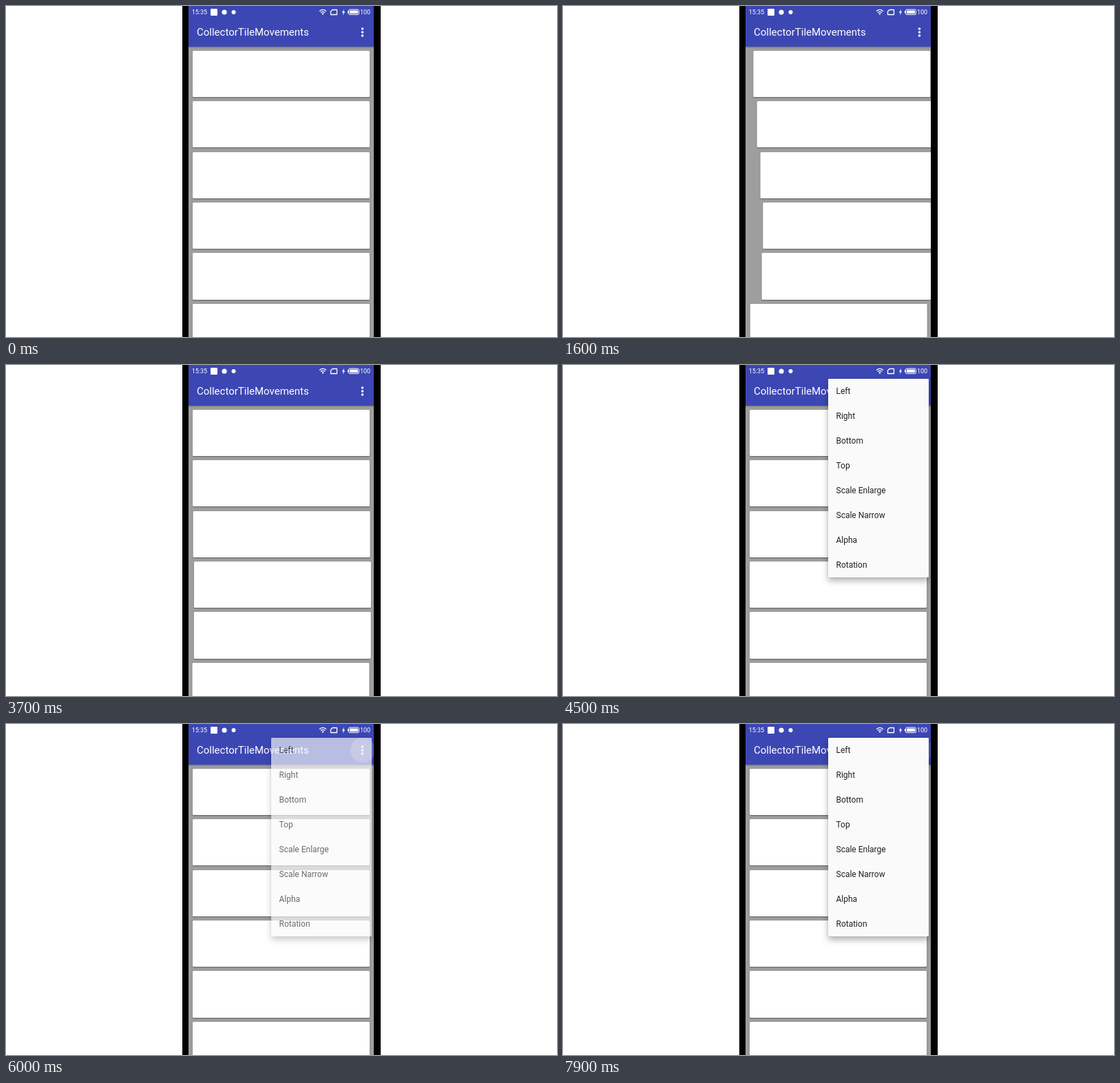
Animation of 800 by 480 pixels, one loop 8000 ms. Source, as an HTML page:

```html
<!DOCTYPE html>
<html lang="en">
<head>
<meta charset="utf-8">
<style>
  html, body { margin: 0; width: 100%; height: 100%; overflow: hidden; background: #fff; }
  body { position: relative; font-family: Roboto, sans-serif; }
  div { position: absolute; box-sizing: border-box; }
  #phone { left: 256px; top: 0; width: 288px; height: 480px; background: #000; }
  #screen { left: 9px; top: 0; width: 269px; height: 480px; overflow: hidden; background: #9e9e9e; }
  .card { left: 5.5px; width: 257.5px; height: 67.3px; border-radius: 1.5px; background: #fff;
          box-shadow: 0 1px 1.5px rgba(0, 0, 0, .4); }
  #bar { left: 0; top: 0; width: 100%; height: 59px; background: #3c47b3; color: #fff;
         box-shadow: 0 1px 2px rgba(0, 0, 0, .3); }
  #bar svg { position: absolute; left: 0; top: 0; }
  #title { left: 12px; top: 28px; font-size: 15px; line-height: 20px; white-space: nowrap; }
  #ripple { left: 234.5px; top: 20px; width: 36px; height: 36px; border-radius: 50%; background: #fff; }
  #menu { left: 119.5px; top: 20px; width: 146.5px; height: 287.5px; border-radius: 1px;
          background: #fafafa; color: #212121;
          box-shadow: 0 5px 10px rgba(0, 0, 0, .3), 0 0 2px rgba(0, 0, 0, .18); }
  .item { left: 0; width: 100%; height: 36px; padding-left: 12px; font-size: 12px; line-height: 36px; }
</style>
</head>
<body>
<div id="phone"><div id="screen">
  <div id="list"></div>
  <div id="bar">
    <svg width="270" height="59" fill="#fff" font-size="9">
      <text x="4.7" y="12.2">15:35</text>
      <rect x="32" y="4" width="10" height="10" rx="1"/>
      <circle cx="52" cy="9" r="3.6"/>
      <circle cx="65.5" cy="9" r="3"/>
      <g fill="none" stroke="#fff" stroke-width="1.3">
        <path d="M190 7.4q5-4 10 0M191.8 9.6q3.2-2.4 6.4 0"/>
        <path d="M209 5.5h6.5v7h-9v-4.5z" stroke-linejoin="round"/>
        <rect x="232.6" y="5.1" width="14.8" height="7.4" rx="1.5" stroke-width="1"/>
      </g>
      <path d="M193.4 11l1.6-1 1.6 1-1.6 2zM226 4.5l-3.2 5h2l-.8 4 3.2-5.2h-2z"/>
      <rect x="234" y="6.5" width="12" height="4.6" rx=".5"/>
      <rect x="231" y="7.2" width="1.5" height="3.2"/>
      <text x="249" y="12.2">100</text>
      <circle cx="252.5" cy="33" r="1.8"/>
      <circle cx="252.5" cy="38" r="1.8"/>
      <circle cx="252.5" cy="43" r="1.8"/>
    </svg>
    <div id="title">CollectorTileMovements</div>
    <div id="ripple"></div>
  </div>
  <div id="menu"></div>
</div></div>
<script>
const LOOP = 8000, FADE = 150, PRESS = 70, STAGGER = 40;
const $ = id => document.getElementById(id);
const clamp = u => Math.max(0, Math.min(1, u));
const ease = u => (1 - Math.cos(Math.PI * clamp(u))) / 2;

function addAll(parent, className, texts) {
  return texts.map(text => {
    const el = document.createElement('div');
    el.className = className;
    el.textContent = text;
    parent.append(el);
    return el;
  });
}
const cards = addAll($('list'), 'card', Array(6).fill(''));
const rows = addAll($('menu'), 'item',
  ['Left', 'Right', 'Bottom', 'Top', 'Scale Enlarge', 'Scale Narrow', 'Alpha', 'Rotation']);
cards.forEach((el, i) => el.style.top = 64.8 + i * 73.4 + 'px');
rows.forEach((el, i) => el.style.top = i * 36 + 'px');

// Offsets of one card, in px, by time since its own start
const swing = t => -270 + 291.6 * ease(t / 400) - 27 * ease((t - 350) / 320) + 5.4 * ease((t - 540) / 200);
const rise = t => 168 * (1 - ease(t / 400));
const effects = [
  (t, i) => [swing(t - i * STAGGER), 0],
  (t, i) => [-swing(t - i * STAGGER), 0],
  (t, i) => [0, rise(t - i * STAGGER)],
  (t, i) => [0, -rise(t - (5 - i) * STAGGER)]
];

// Each visit: tap on the dots, then the start of the chosen effect
const visits = [[260, 1070], [2160, 2927], [4060, 4831], [5860, 6667], [7660, Infinity]];

function draw(time) {
  const chosen = visits.findLastIndex(v => time >= v[1]);
  cards.forEach((el, i) => {
    const [x, y] = chosen < 0 ? [0, 0] : effects[chosen](time - visits[chosen][1], i);
    el.style.transform = `translate(${x}px, ${y}px)`;
  });

  const open = visits.findLastIndex(v => time >= v[0]);
  let shown = 0, ripple = 0, pressed = -1;
  if (open >= 0) {
    const [tap, pick] = visits[open];
    const since = time - tap;
    shown = Math.min(ease((since - 50) / FADE), 1 - clamp((time - pick) / FADE));
    ripple = Math.min(clamp(since / 60), 1 - clamp((since - 150) / 200));
    if (time >= pick - PRESS) pressed = open;
  }
  $('menu').style.opacity = shown;
  $('ripple').style.opacity = ripple * .2;
  rows.forEach((el, i) => el.style.background = i === pressed ? '#f0f0f0' : 'none');
}

function tick() {
  draw(performance.now() % LOOP);
  requestAnimationFrame(tick);
}
tick();
</script>
</body>
</html>
```
